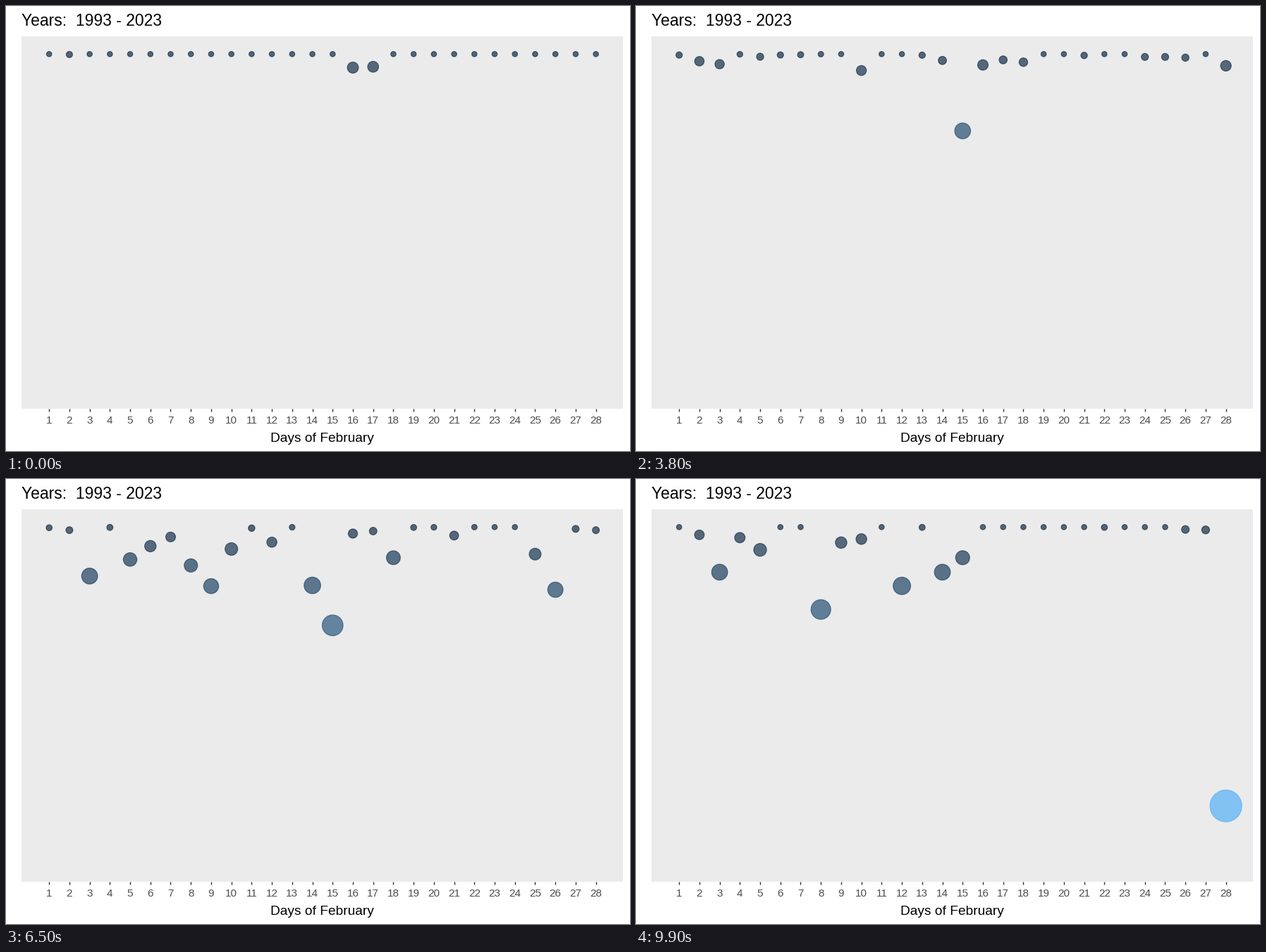
Write a matplotlib script that moves like this. It is 885 by 632 pixels and loops after 10 s.

```python
import matplotlib.pyplot as plt
import numpy as np
from matplotlib.animation import FuncAnimation
from matplotlib.patches import Rectangle

W, H, DPI = 885, 632, 64
PT = 72 / DPI  # points per pixel
FRAMES, INTERVAL = 100, 100

LEFT, TOP, RIGHT, BOTTOM = 22.4, 43.4, 875.4, 571.6
ZERO_Y = 68.3
R_MIN, R_MAX, STROKE = 4.3, 23.2, 1.23
ALPHA = 0.7
PEAK = 396.0

plt.rcParams["font.family"] = "Liberation Sans"

DAYS = np.arange(1, 29)
STEP = (RIGHT - LEFT) / 29.7
DAY_X = LEFT + (DAYS + 0.35) * STEP


def state(first, *values, **single):
    """Drop below the zero line, in pixels, for each day."""
    drop = np.zeros(28)
    drop[first - 1:first - 1 + len(values)] = values
    for day, value in single.items():
        drop[int(day[1:]) - 1] = value
    return drop


KEYS = [0, 25, 49, 74, 99]
DROPS = np.array([
    state(1, d2=0.6, d16=19.2, d17=18),
    state(1, d2=7.8, d3=0.5, d13=3.3, d15=0.4, d16=17.7, d21=4.2,
          d24=8.8, d25=8.8, d26=11, d28=21.8),
    state(1, 2.5, 12.1, 26, 0.5, 6.9, 2.3, 1.6, 0.2, 0, 43, 0, 0, 0, 16.7,
          201, 13.5, 15.2, 21.2, d28=12.2),
    state(3, 94, 0.4, 68, 41, 21, 85, 131, 24.5, 2.3, 33.5, 0.3, 120, 105,
          6.8, 0.3, 56, 0.8, 0.4, 18.8, 0.1, 0, 0, 60, 139, 4),
    state(1, 0, 11, 64, 15, 32.3, 0, 0, 117, 22, 17, 0, 83.5, 0.4, 64, 43.5,
          d22=0.4, d26=3.4, d27=4, d28=PEAK),
])
RADII = R_MIN + (R_MAX - R_MIN) * np.sqrt(DROPS / PEAK)

# Dark to light blue gradient
RAMP = np.array([[19, 43, 67], [51, 106, 152], [86, 177, 247]]) / 255


def tween(table, i):
    return np.array([np.interp(i, KEYS, column) for column in table.T])


def shade(drop):
    rgb = [np.interp(drop / PEAK, [0, 0.5, 1], channel) for channel in RAMP.T]
    return np.column_stack(rgb + [np.full(len(drop), ALPHA)])


fig = plt.figure(figsize=(W / DPI, H / DPI), dpi=DPI, facecolor="white")
ax = fig.add_axes([0, 0, 1, 1])
ax.set_xlim(0, W)
ax.set_ylim(H, 0)
ax.axis("off")


def label(x, y, text, px, color="black", ha="center"):
    ax.text(x, y, text, fontsize=px * PT, color=color, ha=ha, va="baseline")


ax.add_patch(Rectangle((LEFT, TOP), RIGHT - LEFT, BOTTOM - TOP,
                       facecolor="#EBEBEB", linewidth=0))
ax.vlines(DAY_X, BOTTOM, BOTTOM + 4.8, color="#333333", linewidth=1.4 * PT)
for day, x in zip(DAYS, DAY_X):
    label(x, 593.2, str(day), 15.3, "#4D4D4D")
label(LEFT, 28.4, "Years:  1993 - 2023", 22.9, ha="left")
label((LEFT + RIGHT) / 2, 618.6, "Days of February", 19.1)

dots = ax.scatter(DAY_X, np.full(28, ZERO_Y), linewidths=STROKE * PT, zorder=3)


def draw(i):
    drop, radius = tween(DROPS, i), tween(RADII, i) - STROKE / 2
    colors = shade(drop)
    dots.set_offsets(np.column_stack([DAY_X, ZERO_Y + drop]))
    dots.set_sizes((2 * radius * PT) ** 2)
    dots.set_facecolor(colors)
    dots.set_edgecolor(colors)
    return [dots]


anim = FuncAnimation(fig, draw, frames=FRAMES, interval=INTERVAL,
                     repeat=True, repeat_delay=0)
plt.show()
```
